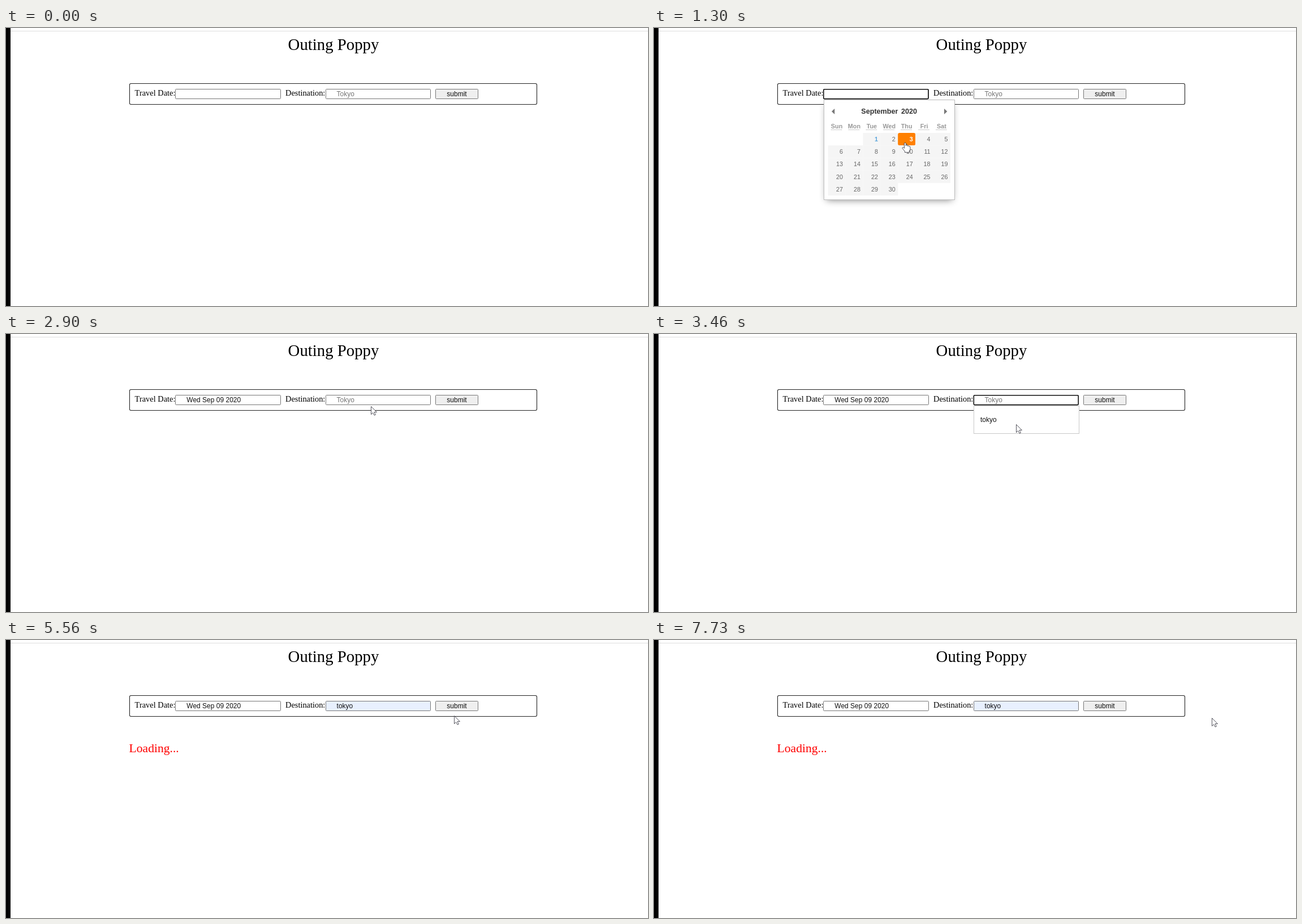
Write an HTML page that moves like this. It is 1135 by 493 pixels and loops after 8 s.

```html
<!DOCTYPE html>
<html lang="en">
<head>
<meta charset="utf-8">
<title>Outing Poppy</title>
<style>
  html, body { margin: 0; width: 100%; height: 100%; overflow: hidden; background: #fff; }
  svg { display: block; width: 100%; height: 100%; }
  text { font-family: "Liberation Sans", Arial, sans-serif; font-size: 12px; fill: #111; white-space: pre; }
  .serif { font-family: "Liberation Serif", "Times New Roman", serif; font-size: 14.4px; fill: #000; }
  .field { fill: #fff; stroke: #767676; }
  .ring { fill: none; stroke: #101010; stroke-width: 1.6; }
  .head { font-size: 12.6px; font-weight: bold; fill: #333; }
  .week { font-size: 10.8px; font-weight: bold; fill: #999; text-anchor: middle; }
  .day { font-size: 10.8px; fill: #666; text-anchor: end; }
  .today { fill: #5aa5dc; font-weight: bold; }
  .hover { fill: #fff; font-weight: bold; }
  .pointer { fill: #fff; stroke: #2a2a35; stroke-width: .8; stroke-linejoin: round; }
</style>
</head>
<body>
<svg viewBox="0 0 1135 493" preserveAspectRatio="none">
  <defs>
    <filter id="blur" x="-20%" y="-20%" width="140%" height="140%"><feGaussianBlur stdDeviation="6.5"/></filter>
  </defs>
  <rect width="1135" height="493" fill="#fff"/>
  <rect x="8" y="5" width="1127" height="1" fill="#dedede"/>
  <rect width="8" height="493"/>
  <text class="serif" x="579" y="39" text-anchor="middle" style="font-size:28.8px">Outing Poppy</text>

  <rect x="218.5" y="98.5" width="720" height="37" rx="2.5" fill="none" stroke="#222" stroke-width="1.1"/>
  <text class="serif" x="227.6" y="120">Travel Date:</text>
  <text class="serif" x="494" y="120">Destination:</text>
  <rect class="field" x="299.5" y="108.5" width="186" height="17" rx="1"/>
  <rect class="field" id="city" x="565.5" y="108.5" width="185" height="17" rx="1"/>
  <rect class="field" id="button" x="759.5" y="108.5" width="75" height="17" rx="1"/>
  <rect class="ring" id="dateRing" x="299.8" y="108.8" width="185.2" height="16.8" rx="1.5"/>
  <rect class="ring" id="cityRing" x="565.3" y="108.8" width="184.9" height="16.8" rx="1.5"/>
  <rect class="ring" id="buttonRing" x="759.8" y="108.8" width="74.4" height="16.8" rx="1.5"/>
  <text id="dateText" x="319.3" y="121">Wed Sep 09 2020</text>
  <text id="hint" x="584.6" y="121" style="fill:#757575">Tokyo</text>
  <text id="cityText" x="584.6" y="121">tokyo</text>
  <rect id="caret" x="613" y="110.5" width="1" height="13"/>
  <text x="797" y="121" text-anchor="middle">submit</text>
  <text class="serif" id="loading" x="217.6" y="199" style="font-size:21.6px;fill:#f00">Loading...</text>

  <g id="popup">
    <rect x="565.5" y="127.5" width="186" height="49" fill="#fff" stroke="#c8c8c8"/>
    <rect id="option" x="566" y="136" width="185" height="32" fill="#e8e8e8"/>
    <text x="577" y="156">tokyo</text>
  </g>

  <g id="calendar">
    <rect x="305" y="136" width="222" height="169" fill="#000" opacity=".5" filter="url(#blur)"/>
    <rect x="300.5" y="127.5" width="231" height="177" fill="#fff" stroke="#bdbdbd"/>
    <text class="head" x="366.3" y="152">September</text>
    <text class="head" x="437" y="152">2020</text>
    <path d="M319.3 143V153L314 148ZM513 143V153L518.3 148Z" fill="#777"/>
  </g>

  <g id="cursor">
    <path class="pointer" id="arrow" d="M.5 .5V14.6L3.7 11.6 6.1 16.2 8.3 15.2 6 10.6H10.4Z"/>
    <path class="pointer" id="hand" d="M-1.5 1.2Q0-.4 1.4 1.2V6Q3 0 4.2 6.4Q6 5 6.9 7Q9 6.2 9 8.6V12.2L7.3 15V17.5H-.6V15.6L-4.8 10.6Q-5.4 8.5-3.4 8.6L-1.5 10.2Z"/>
    <path id="beam" d="M-3-7H3M0-7V7M-3 7H3" fill="none" stroke="#111"/>
  </g>
</svg>
<script>
const LOOP = 8000, STEP = 76.5;
const el = id => document.getElementById(id);
const show = (id, on) => el(id).setAttribute('visibility', on ? 'visible' : 'hidden');
const within = (t, a, b) => t >= a && t < b;

function add(parent, tag, attrs, text = '') {
  const node = document.createElementNS('http://www.w3.org/2000/svg', tag);
  for (const key in attrs) node.setAttribute(key, attrs[key]);
  node.textContent = text;
  return parent.appendChild(node);
}

// Calendar grid: September 2020 starts on a Tuesday.
const LEFT = 307.6, TOP = 186, COL = 30.9, ROW = 22.2;
const calendar = el('calendar');

['Sun', 'Mon', 'Tue', 'Wed', 'Thu', 'Fri', 'Sat'].forEach((name, i) => {
  const x = LEFT + (i + .5) * COL;
  add(calendar, 'text', { class: 'week', x, y: 178 }, name);
  add(calendar, 'path', { d: `M${x - 10} 180.5h20`, stroke: '#999', 'stroke-dasharray': '1 1' });
});

const days = Array.from({ length: 30 }, (_, i) => {
  const x = LEFT + (i + 2) % 7 * COL;
  const y = TOP + Math.floor((i + 2) / 7) * ROW;
  const box = add(calendar, 'rect', { x, y, width: COL + .1, height: ROW + .1 });
  const label = add(calendar, 'text', { x: x + COL - 4.4, y: y + 15 }, i + 1);
  return { x, y, box, label };
});

const ENTRY = { x: 920, y: 422 };
const STOPS = [
  { from: 70, to: 840, x: 402, y: 116 },
  { from: 1000, to: 1300, x: 444, y: 203 },
  { from: 1370, to: 1750, x: 443, y: 216 },
  { from: 1830, to: 2060, x: 429, y: 216 },
  { from: 2590, to: 2900, x: 645, y: 128 },
  { from: 3060, to: 3140, x: 640, y: 118 },
  { from: 3220, to: 3460, x: 640, y: 160 },
  { from: 4400, to: 5010, x: 797, y: 121 },
  { from: 5560, to: 5560, x: 792, y: 134 },
  { from: 5635, to: 6080, x: 880, y: 242 },
  { from: 6950, to: 7330, x: 975, y: 127 },
  { from: 7500, to: 7500, x: 986, y: 138 }
];
const easeOut = u => u * (2 - u);

function pointerAt(t) {
  const i = STOPS.filter(s => t >= s.from).length - 1;
  if (i < 0) return null;
  const stop = STOPS[i], prev = STOPS[i - 1] || ENTRY;
  const gaps = Math.round((stop.to - stop.from) / STEP);
  const gap = (stop.to - stop.from) / gaps || STEP;
  const done = Math.min(gaps, Math.floor((t - stop.from) / gap + .02));
  const u = easeOut((done + 1) / (gaps + 1));
  return { x: prev.x + (stop.x - prev.x) * u, y: prev.y + (stop.y - prev.y) * u };
}

function render(t) {
  const open = within(t, 770, 2300);
  const listed = within(t, 3220, 4080);
  const filled = t >= 3840;
  show('calendar', open);
  show('dateRing', open);
  show('dateText', t >= 2220);
  show('cityRing', within(t, 3140, 5170));
  show('buttonRing', within(t, 5170, 5320));
  show('popup', listed);
  show('option', listed && filled);
  show('hint', !filled);
  show('cityText', filled);
  show('caret', within(t, 4080, 4610));
  show('loading', t >= 5320);
  el('city').style.fill = filled ? '#e8f0fe' : '#fff';

  const pos = pointerAt(t);
  const { x, y } = pos || ENTRY;
  const hit = (left, top, w, h) => within(x, left, left + w) && within(y, top, top + h);
  let overDay = false;
  days.forEach((day, i) => {
    const on = open && hit(day.x, day.y, COL, ROW);
    overDay = overDay || on;
    day.box.setAttribute('fill', on ? '#ff8000' : '#f5f5f5');
    day.box.setAttribute('rx', on ? 3 : 0);
    day.label.setAttribute('class', 'day' + (on ? ' hover' : i ? '' : ' today'));
  });
  el('button').style.fill = hit(759, 108, 76, 18) ? '#e5e5e5' : '#efefef';

  const overField = hit(299, 108, 187, 18) || hit(565, 108, 186, 18);
  const kind = !pos ? '' : overDay ? 'hand' : overField ? 'beam' : 'arrow';
  for (const id of ['arrow', 'hand', 'beam']) show(id, id === kind);
  el('cursor').setAttribute('transform', `translate(${x} ${y})`);
}

const began = performance.now();
function tick() {
  render((performance.now() - began) % LOOP);
  requestAnimationFrame(tick);
}
tick();
</script>
</body>
</html>
```
